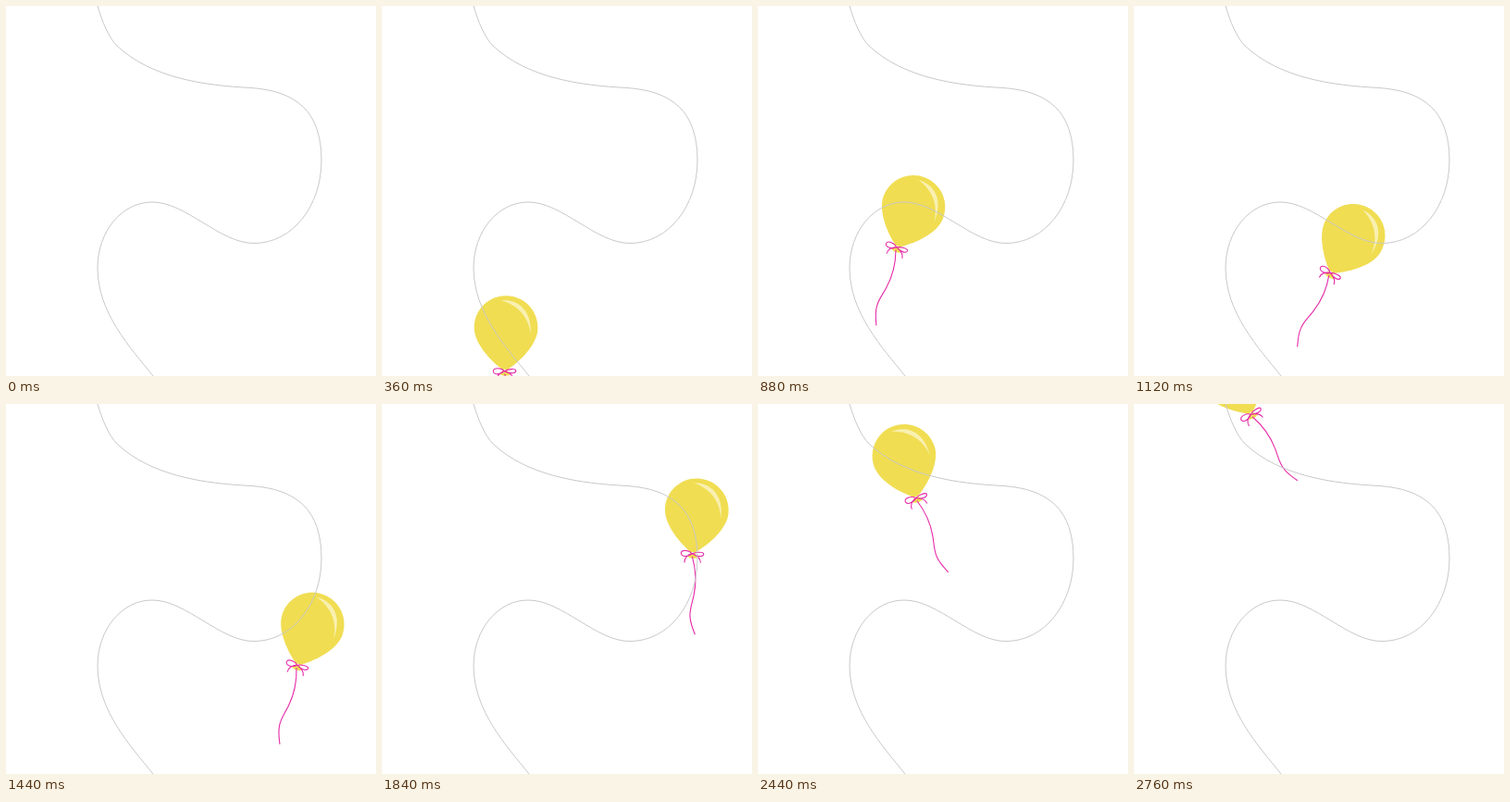
These frames come from a looping animation (400 by 400 pixels, 2.8 s). An HTML page with a canvas:

```html
<!DOCTYPE html>
<html lang="en">
<head>
<meta charset="utf-8">
<title>Balloon</title>
<style>
  html, body { margin: 0; width: 100%; height: 100%; overflow: hidden; background: #fff; }
  canvas { display: block; width: 400px; height: 400px; }
</style>
</head>
<body>
<canvas id="stage" width="400" height="400"></canvas>
<script>
const LOOP = 2800;
const ctx = document.getElementById('stage').getContext('2d');
const rad = deg => deg * Math.PI / 180;

// The flight route, running off the stage at both ends.
const routeData = `M190.7 439 L159 400
  C135 370 99 332 99 283 C99 244 125 212 158 212
  C195 212 231 256.5 268 256.5 C310 256.5 341 216 341 167
  C341 115 315 92 265 88.5 C215 86 157 78 120 43
  C111 34 104 17 99 0 L88.5 -35.7`;
const route = document.createElementNS('http://www.w3.org/2000/svg', 'path');
route.setAttribute('d', routeData);
const routeLine = new Path2D(routeData);
const routeLength = route.getTotalLength();

// Upright body, centred on the head.
const body = new Path2D(`M0 47 C-14 38 -34.4 18 -34.4 0
  C-34.4 -19.5 -19 -34.6 0 -34.6 C19 -34.6 34.4 -19.5 34.4 0
  C34.4 18 14 38 0 47 Z
  M-1.5 45 L-5.5 50.5 Q0 53.5 6 50.5 L1.5 45 Z`);

// Relative to the head centre, in the string's frame.
const shine = new Path2D(`M-2.5 -30 C14 -30 30 -18 26 9.4
  C25.5 -10 14.5 -23.5 -2.5 -30 Z`);

// Relative to the knot.
const ribbon = new Path2D(`M-1 3 C2 14 4 28 0 45 C-2 54 -5 60 -4.5 68 C-4.5 74 -2 81 .5 87.5
  M-1 0 C-4 -4 -12 -5 -13 -1 C-13 4 -4 3 -1 0
  C3 -2 11 -2 11.5 .5 C11 4.5 3 3 -1 0
  C-6 1 -10 5 -9.5 9.5
  M-1 0 C4 2 8 5 8 10`);

// The balloon leans over steadily, then swings back.
function leanAt(p) {
  return p < 0.4 ? -13 + 44.2 * p / 0.4 : 31.2 - 60.5 * (p - 0.4) / 0.6;
}

function drawBalloon(p) {
  const point = route.getPointAtLength(p * routeLength);
  ctx.save();
  ctx.translate(point.x, point.y);
  ctx.rotate(rad(leanAt(p)));
  ctx.translate(14.7, 0);
  ctx.fillStyle = '#f0dd52';
  ctx.fill(body);

  ctx.rotate(rad(-6.3));
  ctx.fillStyle = '#f9f0b0';
  ctx.fill(shine);

  ctx.translate(-4.9, 46.5);
  ctx.strokeStyle = '#e62aa8';
  ctx.lineWidth = 1.1;
  ctx.stroke(ribbon);
  ctx.restore();
}

function render(time) {
  ctx.clearRect(0, 0, 400, 400);
  drawBalloon(time % LOOP / LOOP);
  ctx.strokeStyle = '#c8c8c8';
  ctx.lineWidth = 1;
  ctx.stroke(routeLine);
}

const start = performance.now();
function tick() {
  render(performance.now() - start);
  requestAnimationFrame(tick);
}
tick();
</script>
</body>
</html>
```
